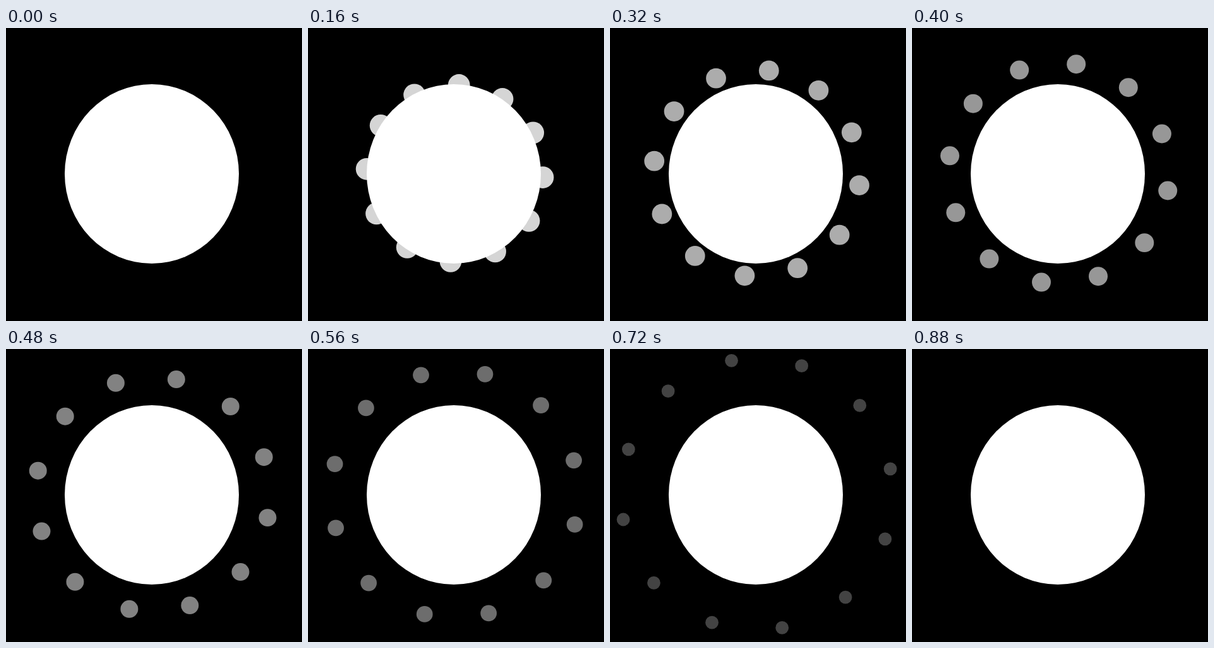
These frames come from a looping animation (469x464 px, 1680 ms). An HTML page with a canvas:

```html
<!DOCTYPE html>
<html lang="en">
<head>
<meta charset="utf-8">
<title>Bursting dots</title>
<style>
  html, body { margin: 0; width: 100%; height: 100%; overflow: hidden; background: #000; }
  canvas { display: block; }
</style>
</head>
<body>
<canvas id="stage" width="469" height="464"></canvas>
<script>
  const ctx = document.getElementById('stage').getContext('2d');
  const LOOP = 1680, STEP = 40, BURST = 880, DOTS = 12;

  function oval(x, y, rx, ry, fill) {
    ctx.fillStyle = fill;
    ctx.beginPath();
    ctx.ellipse(x, y, rx, ry, 0, 0, Math.PI * 2);
    ctx.fill();
  }

  // p runs from 0 to 1 while the ring grows, turns, shrinks its dots and fades
  function drawRing(p) {
    const ring = 113.8 + 147 * p - 28 * p * p;
    const turn = p * (24 - 13.5 * (1 - p) ** 2);
    const size = 18.5 - 5 * p - 6 * p * p;
    const fill = `rgba(255, 255, 255, ${1 - 0.9 * p})`;
    for (let i = 0; i < DOTS; i++) {
      const a = (turn + i * 360 / DOTS) * Math.PI / 180;
      oval(232.6 + ring * Math.sin(a), 229.9 - ring * Math.cos(a), size, size, fill);
    }
  }

  function draw(time) {
    const t = Math.floor((time % LOOP) / STEP) * STEP;
    ctx.fillStyle = '#000';
    ctx.fillRect(0, 0, 469, 464);
    if (t < BURST) drawRing(t / BURST);
    oval(231, 231, 138, 142, '#fff');
  }

  const start = performance.now();
  function tick() {
    draw(performance.now() - start);
    requestAnimationFrame(tick);
  }
  tick();
</script>
</body>
</html>
```
